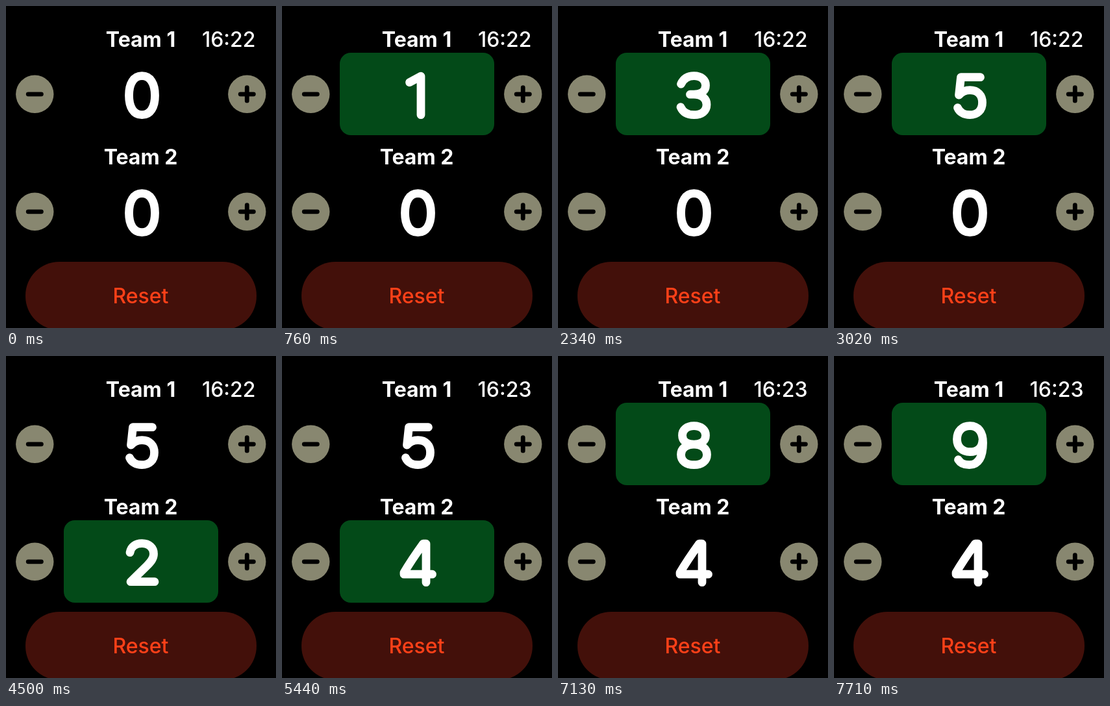
Animation, 416 px wide and 496 px high, one loop 8 s. Source, as an HTML page with a canvas:

```html
<!DOCTYPE html>
<html lang="en">
<head>
<meta charset="utf-8">
<title>Score counter</title>
<style>
  html, body { margin: 0; width: 100%; height: 100%; overflow: hidden; background: #000; }
  canvas { display: block; width: 416px; height: 496px; }
</style>
</head>
<body>
<canvas id="stage" width="416" height="496"></canvas>
<script>
const LOOP = 8000;
const ROW = 181;
const INK = '#fff', GRAY = '#888770', GREEN = '#034a18';
const FONT = 'Inter, Roboto, sans-serif';
const ctx = document.getElementById('stage').getContext('2d');

// Rounded numerals as centre lines around (0, 0)
const NINE = 'M19.5-8C19 4 11 10 0 10C-12 10-20 2-20-9.5C-20-22-12-30 0-30C13-30 20-20 20-4C20 18 13 30-1 30C-9 30-15 27-18 22';
const DIGITS = [
  'M0-30C13-30 20-18 20 0C20 18 13 30 0 30C-13 30-20 18-20 0C-20-18-13-30 0-30Z',
  'M-13-20L4.5-29.5V30',
  'M-18.5-16C-17-25-10-30 0-30C11-30 18-23 18-14C18-7 14-2 8 4L-17.5 29H19.5',
  'M-20-17.5C-16-26-9-30 0-30C11-30 18-24 18-15.5C18-7 11-1.5 0-1.5H-6M0-1.5C12-1.5 19.5 5 19.5 14C19.5 24 12 30 0 30C-10 30-17 26-20.5 18',
  'M12.5 30V-29.5H8C-1-17-14 2-21.5 15V17.5H22',
  'M16-28H-14L-17-0.5C-12-6-6-8 0-8C12-8 19 0 19 11C19 23 11 30 0 30C-9 30-16 26-19 19',
  NINE,
  'M-18-27.5H18.5L-8 30',
  'M0-1.5C-11-1.5-18-7-18-15.5C-18-24-11-30 0-30C11-30 18-24 18-15.5C18-7 11-1.5 0-1.5C-12-1.5-20 5-20 14C-20 24-12 30 0 30C12 30 20 24 20 14C20 5 12-1.5 0-1.5Z',
  NINE
].map(d => new Path2D(d));

// Times at which each team scores
const TAPS = [
  [500, 1340, 1810, 2390, 2760, 6130, 6600, 7010, 7440],
  [3860, 4500, 4840, 5180]
];
const MINUTE = 5000;

function text(str, x, y, weight, color = INK, align = 'center') {
  ctx.font = `${weight} 32px ${FONT}`;
  ctx.textAlign = align;
  ctx.fillStyle = color;
  ctx.fillText(str, x, y);
}

function panel(x, y, w, h, r, color) {
  ctx.fillStyle = color;
  ctx.beginPath();
  ctx.roundRect(x, y, w, h, r);
  ctx.fill();
}

function button(x, y, plus) {
  ctx.fillStyle = GRAY;
  ctx.beginPath();
  ctx.arc(x, y, 29.2, 0, Math.PI * 2);
  ctx.fill();
  panel(x - 13.5, y - 3.4, 27, 6.8, 3.4, '#000');
  if (plus) panel(x - 3.4, y - 13.5, 6.8, 27, 3.4, '#000');
}

function digit(n, x, y) {
  ctx.save();
  ctx.translate(x, y);
  if (n === 6) ctx.rotate(Math.PI);
  ctx.strokeStyle = INK;
  ctx.lineWidth = 12.8;
  ctx.lineCap = ctx.lineJoin = 'round';
  ctx.stroke(DIGITS[n]);
  ctx.restore();
}

function draw(t) {
  ctx.fillStyle = '#000';
  ctx.fillRect(0, 0, 416, 496);
  text(t < MINUTE ? '16:22' : '16:23', 384.5, 63, 550, INK, 'right');

  const done = TAPS.map(list => list.filter(tap => tap <= t));
  const last = done.map(list => list.length ? list[list.length - 1] : -1);
  done.forEach((list, i) => {
    const y = i * ROW;
    if (last[i] > last[1 - i]) panel(89, 72 + y, 238, 127, 17, GREEN);
    text('Team ' + (i + 1), 207.5, 63 + y, 650);
    button(44.3, 135.8 + y, false);
    button(371.3, 135.8 + y, true);
    digit(list.length, 209.5, 137.7 + y);
  });

  panel(30, 394, 356, 105, 52, '#43100a');
  text('Reset', 207.5, 458, 550, '#ff4018');
}

let start;
function tick(now) {
  start ??= now;
  draw((now - start) % LOOP);
  requestAnimationFrame(tick);
}
draw(0);
requestAnimationFrame(tick);
</script>
</body>
</html>
```
